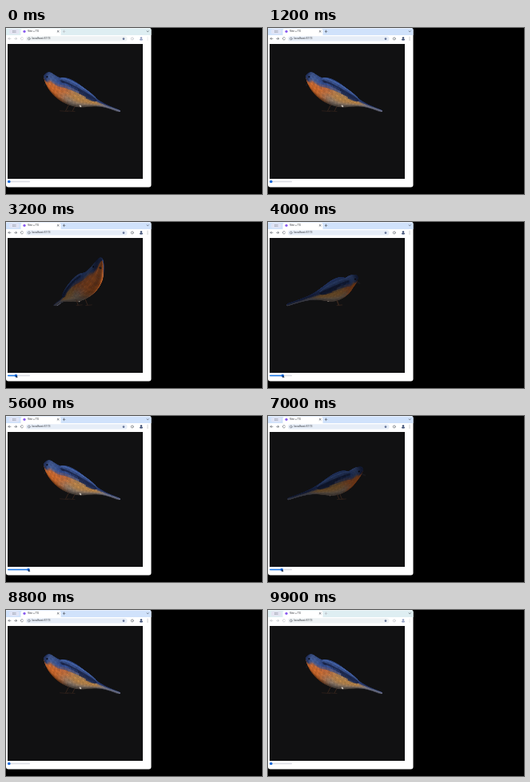
Write an HTML page with a canvas that moves like this. It is 320x208 px and loops after 10 s.

```html
<!DOCTYPE html>
<html lang="en">
<head>
<meta charset="utf-8">
<title>Bluebird turntable</title>
<style>
  html, body { margin: 0; width: 100%; height: 100%; overflow: hidden; background: #000; }
  #stage { position: relative; width: 320px; height: 208px; overflow: hidden; }
  canvas { position: absolute; left: 0; top: 0; width: 320px; height: 208px; }
  span { position: absolute; font: 3.5px/5px Roboto, Arial, sans-serif; white-space: nowrap; color: #30343a; }
  #title { left: 27px; top: 1.7px; }
  #url { left: 32.4px; top: 10.9px; }
</style>
</head>
<body>
<div id="stage">
  <canvas id="view"></canvas>
  <span id="title">Vite + TS</span>
  <span id="url">localhost:5173</span>
</div>
<script>
const LOOP = 10000, STEP = 100;
const CX = 86.5, CY = 104.5, DIST = 111;
const BEAK = 48.5, TAIL = 141, CHEST = 76.5;
const canvas = document.getElementById('view');
const ratio = window.devicePixelRatio || 1;
canvas.width = 320 * ratio;
canvas.height = 208 * ratio;
const g = canvas.getContext('2d');
g.scale(ratio, ratio);

const clamp = v => Math.max(0, Math.min(1, v));
const smooth = (a, b, v) => { const k = clamp((v - a) / (b - a)); return k * k * (3 - 2 * k); };
const bell = (v, mid, w) => Math.exp(-(((v - mid) / w) ** 2));
const lerp = (a, b, k) => a + (b - a) * k;
const mix = (a, b, k) => a.map((v, i) => lerp(v, b[i], k));
const rgb = c => `rgb(${c.map(v => Math.round(v)).join()})`;

// The head looks slightly away from the body's axis
const midZ = x => 8 * smooth(44, 58, x) * (1 - smooth(55, TAIL, x));

// Side-view point to model space
function place(x, y, z) {
  const k = 1 - midZ(x) / DIST;
  return [(x - CX) * k, (y - CY) * k, z + midZ(x)];
}

function body(k) {
  const x = lerp(BEAK, TAIL, k ** 1.4);
  const rise = Math.sqrt(Math.sin(clamp((x - BEAK) / (CHEST - BEAK)) * Math.PI / 2));
  const fall = Math.exp(-(Math.max(0, (x - CHEST) / 32) ** 2.5));
  const h = 15 * rise * fall + 0.7;
  const nape = 1.3 * bell(x, 68, 6) - 1.2 * bell(x, 55, 5);
  return {
    x, z: 0, h: h - nape, w: 0.88 * h + 3 * smooth(105, TAIL, x),
    y: 104 - 0.38 * (TAIL - x) - 7 * Math.exp((BEAK - x) / 7) + nape
  };
}

function wing(side) {
  return k => {
    const x = lerp(69, 112, k), swell = Math.sqrt(Math.sin(Math.PI * k ** 0.7));
    return { x, y: lerp(70, 91, k), z: side * lerp(10, 5, k * k), h: 6.5 * swell + 0.2, w: 3.6 * swell + 0.2 };
  };
}

const CAP = [68, 92, 148], BLUE = [52, 76, 138], SLATE = [28, 38, 72], RIM = [72, 102, 170];
const ORANGE = [200, 104, 46], BEIGE = [142, 126, 114], GOLD = [180, 130, 72], GREY = [112, 114, 132];

function plumage(x, u) {
  let top = mix(CAP, BLUE, smooth(60, 72, x));
  top = mix(top, SLATE, 0.75 * bell(x, 51, 4) + 0.6 * smooth(100, 125, x));
  let low = mix(ORANGE, BEIGE, smooth(62, 82, x) * smooth(0.5, 0.85, u));
  low = mix(low, GOLD, smooth(72, 90, x) * (1 - smooth(0.7, 0.95, u)));
  low = mix(low, GREY, smooth(108, 126, x));
  const edge = 0.48 + 0.28 * (1 - smooth(50, 60, x));
  return mix(top, low, smooth(edge - 0.08, edge + 0.1, u));
}

function feathers(x, u) {
  const c = mix(RIM, SLATE, smooth(0.1, 0.55, u));
  return mix(c, BLUE, 0.5 * smooth(0.6, 1, u) * smooth(75, 95, x));
}

// Daylight falls on one flank only
function shade(c, x, u, side) {
  const lit = side > 0 ? lerp(0.7, 1.04, side) : lerp(0.7, 0.5, -side);
  const barb = 1 + 0.1 * Math.sin(x * 1.1 + u * 31) * Math.sin(x * 0.43 - u * 17);
  return rgb(c.map(v => v * lit * barb * (1 - 0.35 * smooth(0.85, 1, u))));
}

// Skin of quads around a run of elliptic ribs
function loft(shape, paint, rows, cols, facing = 0) {
  const at = (i, j) => {
    const r = shape(i / rows), a = j / cols * 2 * Math.PI;
    return place(r.x, r.y - Math.cos(a) * r.h, r.z + Math.sin(a) * r.w);
  };
  const faces = [];
  for (let i = 0; i < rows; i++) for (let j = 0; j < cols; j++) {
    const a = (j + 0.5) / cols * 2 * Math.PI, u = (1 - Math.cos(a)) / 2, x = shape((i + 0.5) / rows).x;
    faces.push({
      pts: [at(i, j), at(i + 1, j), at(i + 1, j + 1), at(i, j + 1)],
      color: shade(paint(x, u), x, u, facing || Math.sin(a))
    });
  }
  return faces;
}

const stroke = (color, width, ...pts) => ({ color, width, pts: pts.map(p => place(...p)) });
const parts = [
  ...loft(body, plumage, 56, 36),
  stroke('#18181c', 2, [50.5, 67, -1], [46.8, 71.2, -3]),
  stroke('#c8c0b6', 1.8, [92.2, 98, 7], [93, 98.6, 7])
];
for (const side of [1, -1]) {
  const foot = 79 + 4 * (1 - side);
  parts.push(
    ...loft(wing(side), feathers, 22, 14, side * 0.8),
    stroke('#06070c', 1.9, [54, 64.5, side * 8], [54.4, 64.5, side * 8]),
    stroke('#3a281e', 0.9, [foot, 96, side * 4], [foot - 4, 104, side * 4]),
    stroke('#2c201a', 0.9, [foot - 11, 103.8, side * 4], [foot - 1, 104.6, side * 4])
  );
}

function bird(angle) {
  const c = Math.cos(angle), s = Math.sin(angle);
  const turn = ([x, y, z]) => {
    const depth = z * c - x * s, k = 1 / (1 - depth / DIST);
    return [CX + (x * c + z * s) * k, CY + y * k, depth];
  };
  const items = parts.map(({ pts, color, width }) => {
    const flat = pts.map(turn);
    const depth = flat.reduce((sum, p) => sum + p[2], 0) / flat.length;
    return { pts: flat, depth: depth + (width ? 0.8 : 0), color, width };
  }).sort((a, b) => a.depth - b.depth);
  g.lineCap = g.lineJoin = 'round';
  for (const { pts, color, width } of items) {
    g.beginPath();
    pts.forEach(p => g.lineTo(p[0], p[1]));
    g.strokeStyle = g.fillStyle = color;
    g.lineWidth = width || 0.4;
    if (!width) { g.closePath(); g.fill(); }
    g.stroke();
  }
}

function box(color, x, y, w, h, r = 0) {
  g.fillStyle = color;
  g.beginPath();
  g.roundRect(x, y, w, h, r);
  g.fill();
}

function dot(color, x, y, r) {
  g.fillStyle = color;
  g.beginPath();
  g.arc(x, y, r, 0, 7);
  g.fill();
}

function line(color, ...xy) {
  g.strokeStyle = color;
  g.lineWidth = 0.6;
  g.beginPath();
  for (let i = 0; i < xy.length; i += 2) g.lineTo(xy[i], xy[i + 1]);
  g.stroke();
}

function ring(color, x, y, r, from = 0, to = 7) {
  g.strokeStyle = color;
  g.lineWidth = 0.6;
  g.beginPath();
  g.arc(x, y, r, from, to);
  g.stroke();
}

function arrow(color, x, y, dir) {
  const tip = x + 1.5 * dir;
  line(color, x - 1.5 * dir, y, tip, y);
  line(color, tip - 1.3 * dir, y - 1.3, tip, y, tip - 1.3 * dir, y + 1.3);
}

function star(color, x, y) {
  g.fillStyle = color;
  g.beginPath();
  for (let i = 0; i < 10; i++) {
    const a = i * Math.PI / 5 - Math.PI / 2, r = i % 2 ? 0.9 : 2;
    g.lineTo(x + r * Math.cos(a), y + r * Math.sin(a));
  }
  g.fill();
}

function browser(active) {
  const ink = active ? '#4c525c' : '#b4b8be', user = active ? '#34466e' : '#8f9cc0';
  box('#fff', 0, 0, 181.5, 199.5, [0, 2, 3, 3]);
  box(active ? '#d0e2fb' : '#deeef2', 0, 0.5, 181.5, 8.5, [0, 2, 0, 0]);
  box(active ? '#e0e4f6' : '#e4e4f2', 4, 1.6, 12.5, 5.8, 2);
  for (const y of [3.7, 5.3]) line('#8a8f9a', 8, y, 12.2, y);
  box('#fff', 18.5, 1, 50, 8, [2, 2, 0, 0]);
  dot('#8a5cf0', 23, 4.3, 1.6);
  for (const d of [1, -1]) line('#454b55', 65.1 - d, 3.3, 65.1 + d, 5.3);
  line(ink, 71, 4.3, 74, 4.3);
  line(ink, 72.5, 2.8, 72.5, 5.8);
  line('#454b55', 176, 3.7, 177.2, 4.9, 178.4, 3.7);

  arrow(ink, 4.5, 13.3, -1);
  arrow(ink, 12, 13.3, 1);
  ring(ink, 20, 13.3, 1.6, 0.4, 5.6);
  box(active ? '#e6edf7' : '#eef2f4', 25, 10.2, 126.5, 6.4, 3.2);
  ring('#5b616b', 28.8, 13.4, 1.4);
  star('#5a6a90', 147, 13.5);
  ring(ink, 157.8, 13.4, 1.5);
  dot(user, 169, 12.4, 1.2);
  box(user, 167, 13.7, 4, 1.7, 0.8);
  for (const y of [11.8, 13.4, 15]) dot(ink, 177, y, 0.45);
  box('#111112', 2, 20, 169, 169);
}

function slider(v, held) {
  const x = lerp(3.8, 28, v);
  box('#d9dbe2', 2, 191.8, 28, 1.5, 0.75);
  box('#1676e6', 2, 191.8, x - 2, 1.5, 0.75);
  dot('#1467d8', x, 192.5, 1.8);
  if (!held) return;
  g.fillStyle = '#10203c';
  g.beginPath();
  [[0, 0], [0, 3.4], [0.9, 2.7], [2.5, 2.5]].forEach(([a, b]) => g.lineTo(x + a, 192 + b));
  g.fill();
}

function frame() {
  const t = Math.floor(performance.now() % LOOP / STEP) * STEP;
  const v = t < 5600 ? clamp((t - 2020) / 3310) : 1 - clamp((t - 5700) / 2900);
  g.fillStyle = '#000';
  g.fillRect(0, 0, 320, 208);
  browser(t >= 1200 && t < 9300);
  bird(v * 2 * Math.PI);
  slider(v, t >= 1900 && t < 8600);
  requestAnimationFrame(frame);
}
frame();
</script>
</body>
</html>
```
